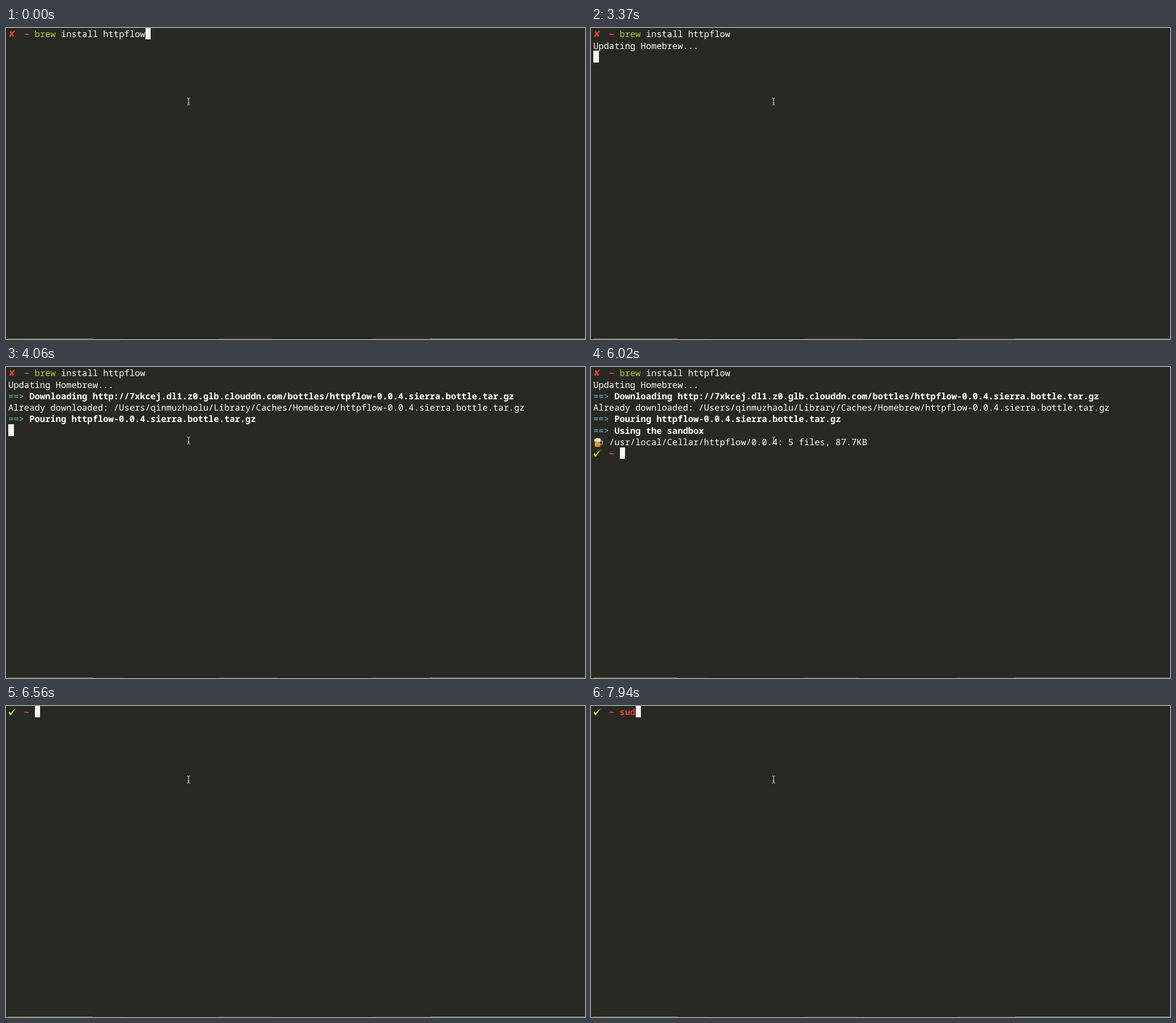
Write an HTML page that moves like this. It is 1021 px wide and 549 px high and loops after 8 s.

```html
<!DOCTYPE html>
<html lang="en">
<head>
<meta charset="utf-8">
<title>Terminal install</title>
<style>
html, body { margin: 0; width: 100%; height: 100%; overflow: hidden; background: #272822; }
svg { display: block; }
text {
  font: 15.49px "Noto Sans Mono", "DejaVu Sans Mono", monospace;
  text-rendering: geometricPrecision;
  white-space: pre;
}
.bold { font-weight: 700; }
.mark { font-family: "DejaVu Sans", sans-serif; }
.tilde { font-family: "DejaVu Sans Mono", monospace; font-weight: 700; }
</style>
</head>
<body>
<svg id="stage" width="1021" height="549" viewBox="0 0 1021 549">
  <rect width="1021" height="549" fill="#272822"/>
  <g id="strip"></g>
  <g id="screen"></g>
  <rect id="cursor" fill="#f8f8f2"/>
  <path d="M319.5 123.5q2 0 2.5 1.5q.5-1.5 2.5-1.5M322 125v9.5M319.5 136q2 0 2.5-1.5q.5 1.5 2.5 1.5M320.5 132.5h3"
        fill="none" stroke="#e8e8e4" stroke-width="1"/>
</svg>
<script>
const LOOP = 8000, CELL = 9.294, ROW = 20.3, LEFT = 4, BASELINE = 16.25;
const WHITE = '#f8f8f2', GREEN = '#b0cc2e', RED = '#e0402c', PINK = '#e0446c', CYAN = '#62c0dc';
const archive = 'httpflow-0.0.4.sierra.bottle.tar.gz';
const $ = id => document.getElementById(id);

const icons = {
  check: '<path d="M.5-4.5L3-6L4.5-3.5Q8-9 13.5-11.5Q8.5-6.5 5 .3H3.2Z" fill="#b0e024"/>',
  beer: `<path d="M12-8h2q2 0 2 2v3q0 2-2 2h-2" fill="none" stroke="#b89a78" stroke-width="1.6"/>
    <rect x="2.5" y="-10" width="10" height="13" rx="1.5" fill="#cf862a"/>
    <path d="M5-6v7M7.5-6v7M10-6v7" stroke="#ecb654"/>
    <path d="M2-7v-3q0-2 2-1.5q3-2 5-.5q4-1 4 2v3q-1.5 1.5-3 0q-2 2-4 0q-2 1.5-4 0" fill="#f1e5cd"/>`
};

const seg = (col, text, fill = WHITE, cls = '') => ({ col, text, fill, cls });
const prompt = ok => [
  ok ? { col: 0, icon: 'check' } : seg(0, '✘', RED, 'mark'),
  seg(3, '~', PINK, 'tilde')
];
const step = text => [seg(0, '==>', CYAN), seg(4, text, '#ffffff', 'bold')];

const output = [
  [...prompt(false), seg(5, 'brew', GREEN), seg(10, 'install httpflow')],
  [seg(0, 'Updating Homebrew...')],
  step('Downloading http://7xkcej.dl1.z0.glb.clouddn.com/bottles/' + archive),
  [seg(0, 'Already downloaded: /Users/qinmuzhaolu/Library/Caches/Homebrew/' + archive)],
  step('Pouring ' + archive),
  step('Using the sandbox'),
  [{ col: 0, icon: 'beer' }, seg(3, '/usr/local/Cellar/httpflow/0.0.4: 5 files, 87.7KB')],
  prompt(true)
];
const typed = n => [[...prompt(true), seg(5, 'sud'.slice(0, n), RED, 'bold')]];

// Each state: start time, lines, cursor column, cursor row
const states = [
  [0, output.slice(0, 1), 26, 0],
  [980, output.slice(0, 1), 0, 1],
  [3370, output.slice(0, 2), 0, 2],
  [4060, output.slice(0, 5), 0, 5],
  [4180, output.slice(0, 6), 0, 6],
  [4770, output.slice(0, 7), 0, 7],
  [4860, output, 5, 7],
  [6560, typed(0), 5, 0],
  [7730, typed(1), 6, 0],
  [7840, typed(2), 7, 0],
  [7940, typed(3), 8, 0]
];

function drawSegment({ col, text, fill, cls, icon }, row) {
  const x = LEFT + col * CELL, y = Math.round(BASELINE + row * ROW);
  if (icon) return `<g transform="translate(${x} ${y})">${icons[icon]}</g>`;
  return `<text class="${cls}" x="${x}" y="${y}" fill="${fill}">${text.replace(/>/g, '&gt;')}</text>`;
}

// The cursor block fills whole pixels
function placeCursor(col, row) {
  const x = Math.ceil(LEFT + col * CELL), y = Math.floor(row * ROW);
  const box = {
    x, y,
    width: Math.ceil(LEFT + (col + 1) * CELL) - x,
    height: Math.round((row + 1) * ROW) - y
  };
  for (const key in box) $('cursor').setAttribute(key, box[key]);
}

// Top edge of the status bar: start, end, colour
function drawStrip(split) {
  const parts = [
    [4, 32, '#77780c'], [32, 153, '#74726a'], [153, 209, '#3a2426'],
    [209, 375, '#301418'], [375, split, '#45383a'], [split, 645, '#301418'],
    [645, 748, '#45383a'], [748, 850, '#7c7a72'], [850, 1021, '#7c7a72']
  ];
  return parts.map(([a, b, fill]) =>
    `<rect x="${a}" y="548" width="${b - a}" height="1" fill="${fill}"/>`).join('');
}

let shown, shownSplit;
function render(t) {
  const state = states.findLast(s => s[0] <= t);
  const split = t >= 980 && t < 6020 ? 480 : 470;
  if (split !== shownSplit) $('strip').innerHTML = drawStrip(shownSplit = split);
  if (state === shown) return;
  shown = state;
  const [, lines, col, row] = state;
  $('screen').innerHTML = lines.map((line, i) => line.map(s => drawSegment(s, i)).join('')).join('');
  placeCursor(col, row);
}

const start = performance.now();
function frame() {
  render((performance.now() - start) % LOOP);
  requestAnimationFrame(frame);
}
frame();
</script>
</body>
</html>
```
